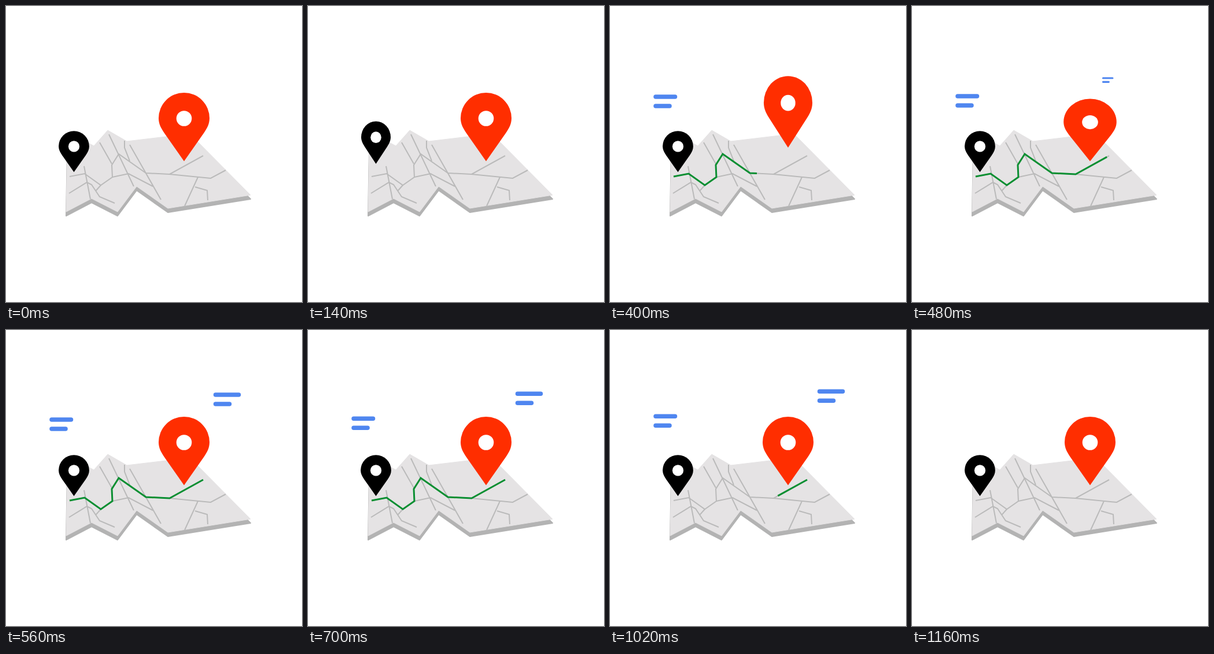
These frames come from a looping animation (512x512 px, 1200 ms). An HTML page:

```html
<!DOCTYPE html>
<html lang="en">
<head>
<meta charset="utf-8">
<title>Map route</title>
<style>
  html, body { margin: 0; height: 100%; overflow: hidden; background: #fff; }
  svg { display: block; width: 512px; height: 512px; }
  .line { fill: none; stroke: #bababa; stroke-width: 2; }
  #route { stroke: #0b8f32; stroke-width: 3; }
  .label { fill: none; stroke: #4f86f0; stroke-width: 7.5; stroke-linecap: round; }
</style>
</head>
<body>
<svg viewBox="0 0 512 512">
  <defs>
    <path id="sheet" stroke-linejoin="round"
      d="M104 356L148 333 193 356 226 312 280 350 423 327 318 221 209 234 176 215 152 242 127 229 106 242Z"/>
    <path id="way" pathLength="1"
      d="M110 295L136 290 164 310 184 296 183 275 195 256 242 289 283 291 341 259"/>
    <path id="drop" d="M0 .5L-34-48C-40-57-44-64-44-74A44 44 0 0 1 44-74C44-64 40-57 34-48Z"/>
  </defs>
  <use href="#sheet" y="7" fill="#b3b3b3" stroke="#b3b3b3" stroke-width="2"/>
  <use href="#sheet" fill="#e5e3e4" stroke="#e5e3e4"/>
  <use href="#way" class="line"/>
  <path class="line" d="M109 324L140 305 148 309 162 330 188 341M155 320L164 310
    M135 277L146 334M162 236L183 273M178 222L221 312M184 296L212 290 254 312
    M205 233V245L214 268M214 240L268 335M283 291L354 298 380 284
    M332 296L309 346M327 313L348 319 349 336"/>
  <use href="#way" id="route" class="line"/>
  <path class="label" d="M0 0H33.5M0 16H24"/>
  <path class="label" d="M0 0H40M0 16H24"/>
  <g class="pin"><use href="#drop"/><circle cy="-73.5" r="16" fill="#fff"/></g>
  <g class="pin" fill="#ff2e00"><use href="#drop"/><circle cy="-73.5" r="13.3" fill="#fff"/></g>
</svg>
<script>
const LOOP = 1200;
const route = document.getElementById('route');
const labels = document.querySelectorAll('.label');
const pins = document.querySelectorAll('.pin');

// Each stop has a pin tip, a pin size and the place of its label
const stops = [
  { delay: 0, x: 117.5, y: 287, size: .6, labelX: 79, labelY: 162 },
  { delay: 240, x: 308, y: 268, size: 1, labelX: 362.5, labelY: 119 },
];

const progress = (t, from, to) => Math.min(1, Math.max(0, (t - from) / (to - from)));
const smooth = u => u * u * (3 - 2 * u);
const bump = (t, from, to) => Math.sin(Math.PI * progress(t, from, to)) ** 2;

function drawRoute(t) {
  const head = smooth(progress(t, 240, 500));
  const tail = smooth(progress(t, 835, 1095));
  route.style.visibility = head > tail ? 'visible' : 'hidden';
  route.style.strokeDasharray = `${head - tail} 2`;
  route.style.strokeDashoffset = -tail;
}

// Crouch, leap with a stretch, squash on landing
function drawPin(pin, { x, y, size }, t) {
  const sy = 1 - .15 * bump(t, 0, 100) + .045 * bump(t, 100, 220) - .13 * bump(t, 210, 310);
  const sx = 1 + (1 - sy) * (sy > 1 ? 1 : .45);
  const u = progress(t, 70, 230);
  const lift = 96 * u * (1 - u) * size;
  pin.setAttribute('transform', `translate(${x} ${y - lift}) scale(${sx * size} ${sy * size})`);
}

// Pops out of the pin's top, drifts upwards, then shrinks back
function drawLabel(label, { delay, x, y, size, labelX, labelY }, t) {
  const open = 1 - (1 - progress(t, 220 + delay, 310 + delay)) ** 2;
  const scale = open * (1 - progress(t, 1080, 1155) ** 2);
  const top = y - 135 * size;
  label.style.visibility = scale > 0 ? 'visible' : 'hidden';
  label.setAttribute('transform', `translate(${x} ${top}) scale(${scale})
    translate(${labelX - x} ${labelY - .0125 * t - top})`);
}

function draw() {
  const t = performance.now() % LOOP;
  drawRoute(t);
  stops.forEach((stop, i) => {
    drawPin(pins[i], stop, t - stop.delay);
    drawLabel(labels[i], stop, t);
  });
  requestAnimationFrame(draw);
}
draw();
</script>
</body>
</html>
```
